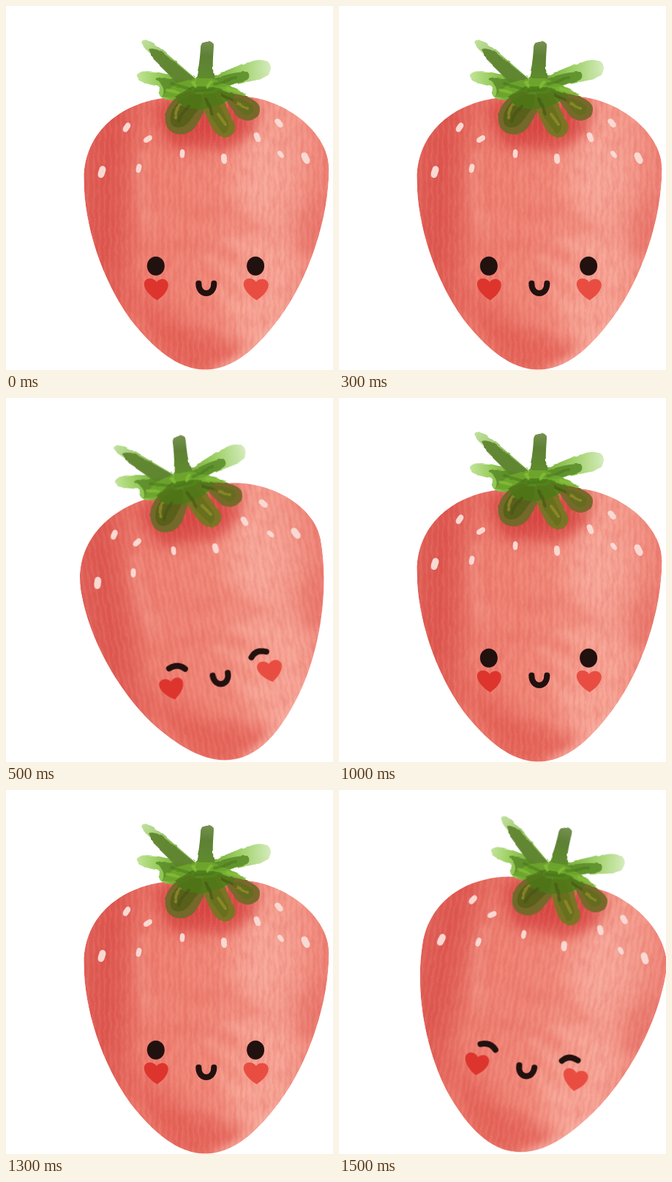
An HTML page for the animation above (2000 ms loop, 447 px wide and 498 px high).

```html
<!DOCTYPE html>
<html lang="en">
<head>
<meta charset="utf-8">
<title>Strawberry</title>
<style>
html, body { margin: 0; width: 100%; height: 100%; overflow: hidden; background: #fff; }
svg { display: block; width: 100vw; height: 100vh; }
.line { fill: none; stroke-linecap: round; stroke-linejoin: round; }
</style>
</head>
<body>
<svg viewBox="0 0 447 498">
<defs>
  <path id="shape" d="M215 126C160 133 106.5 170 106.5 237C106.5 300 131 375 171 430C201 468 235 497.5 272 497.5C311 497.5 343 468 373 428C414 374 441.5 290 441.5 222C441.5 182 400 140 347 127C300 118 250 120 215 126Z"/>
  <clipPath id="body"><use href="#shape"/></clipPath>
  <filter id="soft" x="-60%" y="-60%" width="220%" height="220%" color-interpolation-filters="sRGB"><feGaussianBlur stdDeviation="15"/></filter>
  <filter id="mist" x="-60%" y="-60%" width="220%" height="220%" color-interpolation-filters="sRGB"><feGaussianBlur stdDeviation="7"/></filter>
  <filter id="rough" x="-10%" y="-10%" width="120%" height="120%" color-interpolation-filters="sRGB">
    <feTurbulence type="fractalNoise" baseFrequency=".07" numOctaves="2" seed="4"/>
    <feDisplacementMap in="SourceGraphic" scale="3" xChannelSelector="R" yChannelSelector="G"/>
  </filter>
  <filter id="wobble" x="0" y="0" width="100%" height="100%" color-interpolation-filters="sRGB">
    <feTurbulence type="fractalNoise" baseFrequency=".08 .07" numOctaves="2" seed="7"/>
    <feDisplacementMap in="SourceGraphic" scale="6" xChannelSelector="R" yChannelSelector="G"/>
  </filter>
  <filter id="grain" x="0" y="0" width="100%" height="100%" color-interpolation-filters="sRGB">
    <feTurbulence type="fractalNoise" baseFrequency=".12 .05" numOctaves="3" seed="11"/>
    <feColorMatrix values="0 0 0 0 .82  0 0 0 0 .25  0 0 0 0 .23  2 0 0 0 -.8"/>
  </filter>
  <pattern id="ribs" width="7.6" height="20" patternUnits="userSpaceOnUse">
    <path d="M2 0V20" stroke="#d8463f" stroke-width="2"/>
    <path d="M5.8 0V20" stroke="#ffc4b4" stroke-width="2"/>
  </pattern>
  <linearGradient id="skin" x1="106" x2="442" y1="230" y2="250" gradientUnits="userSpaceOnUse">
    <stop offset="0" stop-color="#e1645b"/><stop offset=".1" stop-color="#df5c54"/>
    <stop offset=".17" stop-color="#e4685e"/><stop offset=".26" stop-color="#ee8072"/>
    <stop offset=".55" stop-color="#f18a7b"/><stop offset=".72" stop-color="#f6a192"/>
    <stop offset=".86" stop-color="#f49b8d"/><stop offset="1" stop-color="#ee8276"/>
  </linearGradient>
  <linearGradient id="tipL" x1="184" y1="46" x2="225" y2="82" gradientUnits="userSpaceOnUse">
    <stop offset="0" stop-color="#c4e4a2"/><stop offset="1" stop-color="#86b850"/>
  </linearGradient>
  <linearGradient id="tipM" x1="178" x2="240" gradientUnits="userSpaceOnUse">
    <stop offset="0" stop-color="#c3e59c"/><stop offset=".45" stop-color="#9bce60"/><stop offset="1" stop-color="#6fa932"/>
  </linearGradient>
  <linearGradient id="tipR" x1="280" x2="362" gradientUnits="userSpaceOnUse">
    <stop offset="0" stop-color="#73ad35"/><stop offset=".5" stop-color="#9fd068"/><stop offset="1" stop-color="#d5ecbd"/>
  </linearGradient>
  <linearGradient id="stem" x1="275" y1="48" x2="268" y2="115" gradientUnits="userSpaceOnUse">
    <stop offset="0" stop-color="#75914f"/><stop offset=".3" stop-color="#5e8035"/><stop offset="1" stop-color="#5f9228"/>
  </linearGradient>
</defs>

<g id="berry">
  <g clip-path="url(#body)">
    <use href="#shape" fill="url(#skin)"/>
    <g filter="url(#soft)">
      <path d="M165 145C128 190 130 270 150 340" class="line" stroke="#da4f49" stroke-width="20" opacity=".5"/>
      <path d="M195 130L345 125L325 180L225 190Z" fill="#d54441"/>
      <path d="M150 370L225 500H315L330 465L250 440Z" fill="#e1584f" opacity=".75"/>
      <path d="M412 275L432 255L422 330L392 360Z" fill="#e1635a" opacity=".8"/>
      <ellipse cx="350" cy="230" rx="36" ry="55" fill="#f9b0a2" opacity=".6"/>
      <path d="M325 440Q370 390 385 340" class="line" stroke="#f8ac9e" stroke-width="34" opacity=".75"/>
    </g>
    <g filter="url(#mist)">
      <path d="M212 140L228 190L300 198L345 160Z" fill="#d94a45" opacity=".55"/>
      <path d="M240 275Q300 275 345 305M195 335Q260 315 310 345" class="line" stroke="#e87468" stroke-width="12" opacity=".5"/>
      <path d="M275 340L350 392M300 320L375 345M290 385L325 425" class="line" stroke="#f9b2a4" stroke-width="9" opacity=".65"/>
      <path d="M186 205Q175 255 200 310" class="line" stroke="#f4a092" stroke-width="14" opacity=".5"/>
      <path d="M290 500Q340 480 385 418" class="line" stroke="#fbc0b4" stroke-width="12" opacity=".75"/>
    </g>
    <rect x="96" y="110" width="356" height="398" fill="url(#ribs)" filter="url(#wobble)" opacity=".1"/>
    <rect x="96" y="110" width="356" height="398" filter="url(#grain)" opacity=".16"/>
  </g>

  <g id="seeds" fill="#f9d9d3"></g>

  <g filter="url(#rough)">
    <path d="M187 47C195 45 203 52 214 60L259 99L250 116L232 103L196 64C189 58 182 50 187 47Z" fill="url(#tipL)"/>
    <path d="M178 96C181 88 194 89 205 90L240 97L262 120L235 128Q205 132 209 111C195 106 178 104 178 96Z" fill="url(#tipM)"/>
    <path d="M270 101C293 92 316 81 338 75C360 69 368 85 357 95C343 105 325 102 306 109L329 121L315 131L268 132Z" fill="url(#tipR)"/>
    <path d="M195 59Q205 56 217 66L259 100L256 118L235 106L203 75Z" fill="#5f832f" opacity=".92"/>
    <path d="M204 100Q224 94 260 110L252 126L213 124Q221 112 204 100Z" fill="#578625" opacity=".8"/>
    <path d="M330 90Q338 101 320 104L276 117L263 110Q300 90 330 90Z" fill="#578a26" opacity=".85"/>
    <path d="M266 57C266 45 284 45 284 55C283 72 281 88 286 100L276 118H254C262 99 265 75 266 57Z" fill="url(#stem)"/>
    <path d="M213 123L232 106L258 99L282 99L318 114L328 123L300 132L235 131Z" fill="#72ac2c" opacity=".75"/>

    <path d="M250 117C226 124 216 142 218 158C221 181 250 179 259 165C268 154 274 146 270 125Z" fill="#74692a"/>
    <path d="M262 122C272 146 276 160 287 174C300 187 316 177 313 162C306 147 298 131 291 118Z" fill="#7c7425"/>
    <path d="M285 116C301 121 306 144 321 154C336 163 351 149 346 136C338 123 316 120 285 116Z" fill="#78692b"/>
    <path d="M246 124C226 136 221 153 227 163C236 171 250 163 254 152C266 140 270 131 266 120Z" fill="#566019" opacity=".9"/>
    <path d="M270 120L279 150L297 175Q306 171 304 160L286 122Z" fill="#64701d" opacity=".85"/>
    <path d="M286 119C310 124 313 139 326 149C337 151 342 141 336 135C322 124 310 125 286 119Z" fill="#616d1e" opacity=".85"/>
    <path d="M232 124L254 110L282 110L314 122L296 134L267 142L240 138Z" fill="#4c7a17" opacity=".8"/>
    <g class="line" stroke-width="4">
      <path d="M238 136Q230 145 232 153M290 148L300 162M312 131L330 140" stroke="#99902c" opacity=".7"/>
      <path d="M250 137Q238 148 236 158M273 127L282 148M296 122L314 132" stroke="#425215" opacity=".55"/>
      <path d="M226 106L252 114M286 107L314 98M258 116L282 114" stroke="#47741a" opacity=".5"/>
      <path d="M256 104L259 110M281 104L276 110M303 113L318 117M220 115L236 118" stroke="#8bc53b" opacity=".65"/>
    </g>
  </g>

  <g transform="translate(-.2 -.6)">
    <path d="M207 403C201 400 189 390 189 381C189 372 201 371 206 378C212 371 222 374 222 382C222 391 213 399 207 403Z" fill="#dd352d"/>
    <path d="M343 403C337 400 325 390 325 381C325 372 337 371 342 378C348 371 359 374 359 382C359 391 349 399 343 403Z" fill="#e94d41"/>
    <path d="M263.5 380C263 398 285 398 284.5 380" class="line" stroke="#21110f" stroke-width="8"/>
    <g id="open" fill="#21110f">
      <ellipse cx="205" cy="356.4" rx="12" ry="13"/>
      <ellipse cx="341.3" cy="356.4" rx="12" ry="13"/>
    </g>
    <g id="shut" class="line" stroke="#21110f" stroke-width="8">
      <path d="M206.5 360Q220 355 228 364.5"/>
      <path d="M341.5 361Q328 355 320 365"/>
    </g>
  </g>
</g>
</svg>
<script>
const $ = id => document.getElementById(id);

// x, y, tilt, size
const seeds = [
  [165, 166, 30, 1], [194, 182, 55, .95], [131, 227, 14, 1.2], [181.5, 222, 8, .9],
  [241, 202, 0, .85], [298, 209, -8, 1], [343.5, 179.5, -24, 1], [373, 160, -42, 1],
  [375.5, 203, -38, .8], [409.5, 208, -28, 1.2]
];
$('seeds').innerHTML = seeds.map(([x, y, a, s]) =>
  `<path transform="translate(${x} ${y}) rotate(${a}) scale(${s})"
    d="M-1 -7Q4 -7 4 -2L3.5 4Q2 7.5 -1 7Q-4 6 -4 1L-3.5 -4Q-3 -6 -1 -7Z"/>`).join('');

const STEP = 500;
const tilts = [0, -10.2, 0, 9.1];

function draw(ms) {
  const tilt = tilts[Math.floor(ms / STEP) % tilts.length];
  $('berry').setAttribute('transform', `rotate(${tilt} 274 272)`);
  $('open').style.display = tilt ? 'none' : '';
  $('shut').style.display = tilt ? '' : 'none';
}

const start = performance.now();
function tick() {
  draw(performance.now() - start);
  requestAnimationFrame(tick);
}
draw(0);
tick();
</script>
</body>
</html>
```
